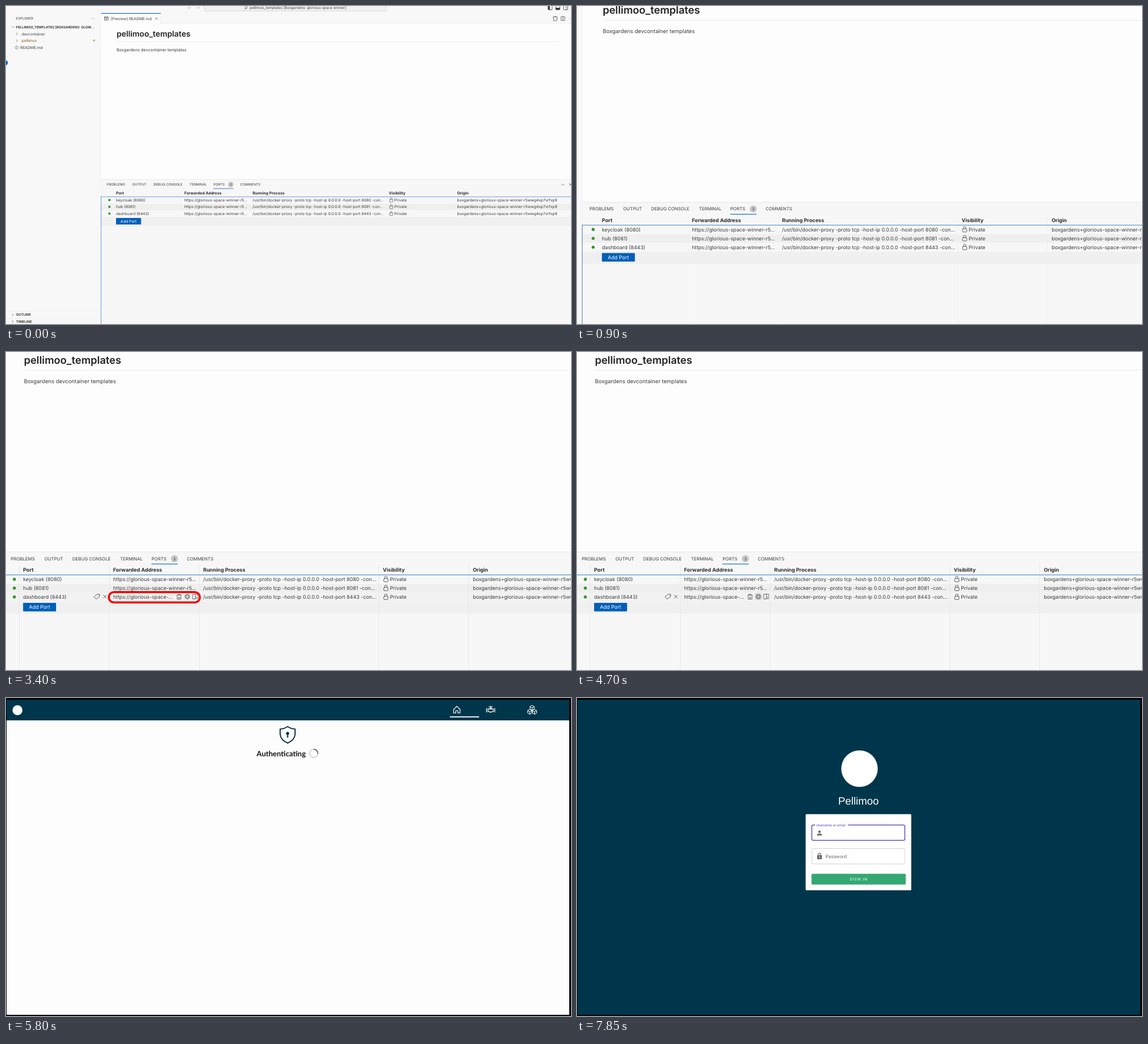
An HTML page for the animation above (8000 ms loop, 960x540 px).

```html
<!DOCTYPE html>
<html lang="en">
<head>
<meta charset="utf-8">
<title>Opening a forwarded port</title>
<style>
  html, body { margin: 0; width: 100%; height: 100%; overflow: hidden; background: #fff; }
  svg { display: block; width: 960px; height: 540px; }
  text { white-space: pre; text-rendering: geometricPrecision; }
  .ui { font-family: Inter, "Liberation Sans", sans-serif; }
  .web { font-family: Lato, "Open Sans", sans-serif; }
  .form { font-family: Roboto, sans-serif; }
  .line { fill: none; stroke-linecap: round; stroke-linejoin: round; }
</style>
</head>
<body>
<svg id="stage" viewBox="0 0 960 540" xmlns="http://www.w3.org/2000/svg"></svg>
<script>
const LOOP = 8000, STEP = 50;
const NAVY = '#00364b', INK = '#3b3b3b', BLUE = '#005fb8';
const PORT_X = [187, 303, 419, 650.5, 766.5];

// Markup helpers: text is placed by its vertical centre.
const text = (x, cy, size, str, extra = '') =>
  `<text x="${x}" y="${(cy + size * 0.36).toFixed(2)}" font-size="${size}" ${extra}>${str}</text>`;
const rect = (x, y, w, h, fill, extra = '') =>
  `<rect x="${x}" y="${y}" width="${w}" height="${h}" fill="${fill}" ${extra}/>`;
const circle = (x, y, r, fill, extra = '') =>
  `<circle cx="${x}" cy="${y}" r="${r}" fill="${fill}" ${extra}/>`;
const line = (d, color, width = 0.7, extra = '') =>
  `<path class="line" d="${d}" stroke="${color}" stroke-width="${width}" ${extra}/>`;
const group = (id, body, extra = '') => `<g id="${id}" ${extra}>${body}</g>`;
const pageFill = color => rect(1, 3, 956, 535, color);
const bold = 'font-weight="700"', mid = 'text-anchor="middle"';

function titleBar() {
  return rect(337, -6, 310, 14.5, '#f0f0f0', 'rx="3" stroke="#d2d2d2" stroke-width=".7"') +
    text(414, 3, 6.15, 'pellimoo_templates [Boxgardens: glorious space winner]') +
    line('M405 6l2-2m0 0a2 2 0 1 1 3-2.500a2 2 0 0 1-3 2.500', INK, 0.6) +
    line('M315 3h-6m2.500-2.500l-2.500 2.500l2.500 2.500M323 3h6m-2.500-2.500l2.500 2.500l-2.500 2.500', '#b5b5b5', 0.6) +
    [921, 934, 947.5].map((x, i) =>
      rect(x, -0.5, 7, 7, 'none', `rx="1" stroke="${INK}" stroke-width=".8"`) +
      [rect(x, 0, 3, 6, INK), rect(x, 3, 7, 3, INK), line(`M${x + 4.5} 0v6`, INK)][i]).join('');
}

function sidebar() {
  const chevron = (y, open) => open
    ? line(`M9.800 ${y - 1}l2 2l2-2`, INK, 0.6)
    : line(`M17.600 ${y - 2}l2 2l-2 2`, INK, 0.6);
  return circle(-1, 96.5, 4, BLUE) +
    text(17, 21.3, 5.7, 'EXPLORER') + text(145, 19.5, 7, '...') +
    chevron(36, true) + text(17, 36, 5.65, 'PELLIMOO_TEMPLATES [BOXGARDENS: GLORI...', bold) +
    chevron(47.5) + text(25, 47.5, 6.4, '.devcontainer') +
    chevron(59) + text(25, 59, 6.4, '.pellimoo', 'fill="#895503"') + circle(149.7, 58.7, 1.9, '#c3b590') +
    circle(18, 70.5, 2.7, 'none', 'stroke="#4a6f8c" stroke-width=".6"') + line('M18 70.200v1.600M18 68.900v.1', '#4a6f8c', 0.7) +
    text(24, 70.4, 6.5, 'README.md') +
    ['OUTLINE', 'TIMELINE'].map((s, i) =>
      line(`M10.500 ${522.4 + i * 11.4}l2 2l-2 2`, INK, 0.6) + text(17, 524.4 + i * 11.4, 5.75, s, bold)).join('') +
    rect(0, 518.5, 161, 0.6, '#ececec') + rect(0, 530, 161, 0.6, '#ececec');
}

function editor() {
  return rect(161.5, 12, 800, 282.5, '#fdfdfd') +
    rect(263, 12, 700, 18, '#f8f8f8') + rect(263, 29.6, 700, 0.6, '#e5e5e5') +
    rect(262.6, 12, 0.6, 18, '#e5e5e5') + rect(161.5, 12, 101.5, 1, BLUE) +
    rect(167.5, 18.3, 6, 5.6, 'none', `stroke="${INK}" stroke-width=".7"`) +
    line('M167.500 20.200h6M170.500 20.200v3.700', INK, 0.7) +
    text(178, 21.4, 6.5, '[Preview] README.md') +
    line('M253.800 19.500l3.600 3.600m0-3.600l-3.600 3.600', INK, 0.6) +
    line('M935 18h-4.500v7h5.500v-3.500M929.500 20l1.500-2M933 18.500h3.500v3', INK) +
    rect(943, 18, 6.5, 6.5, 'none', `rx=".6" stroke="${INK}" stroke-width=".7"`) + line('M946.250 18v6.500', INK) +
    text(956, 19.5, 7, '...') +
    text(188, 47, 13.4, 'pellimoo_templates', 'font-weight="600" fill="#222"') +
    rect(188, 60, 752, 0.6, '#e6e6e6') +
    text(188, 74.5, 7, 'Boxgardens devcontainer templates');
}

function panel() {
  const tabs = [[171, 'PROBLEMS'], [214.5, 'OUTPUT'], [250.5, 'DEBUG CONSOLE'], [312, 'TERMINAL'], [352.5, 'PORTS'], [398, 'COMMENTS']];
  const heads = ['Port', 'Forwarded Address', 'Running Process', 'Visibility', 'Origin'];
  const rows = [['keycloak', 8080], ['hub', 8081], ['dashboard', 8443]];
  const url = 'https://glorious-space-winner-r5...';
  let out = rect(161.5, 294.5, 800, 246, '#f7f7f7') + rect(161.5, 294.2, 800, 0.6, '#e2e2e2') +
    rect(161.5, 335.6, 800, 11.2, '#efefef') + rect(161.5, 358.2, 800, 15.6, '#f0f0f0') +
    group('rowHover', rect(161.5, 347, 800, 11.2, '#f2f2f2')) +
    group('columns', [181.6, 297.7, 413.7, 645, 760.7].map(x => rect(x, 311.5, 0.8, 230, '#e8e8e8')).join('')) +
    tabs.map(([x, s]) => text(x, 303.2, 5.75, s)).join('') +
    circle(382, 303.2, 4.6, '#c6c6c6') + text(382, 303.2, 5.2, '3', mid) +
    rect(352.3, 309.6, 34, 0.8, BLUE) +
    line('M944 304.500l2.300-2.300l2.300 2.300M957 301l4 4m0-4l-4 4', INK, 0.6) +
    heads.map((s, i) => text(PORT_X[i], 317.8, 6.6, s, 'font-weight="700" fill="#2c2c2c"')).join('');
  rows.forEach(([name, port], i) => {
    const y = 329.6 + i * 11.4;
    const cells = [`${name} (${port})`, url,
      `/usr/bin/docker-proxy -proto tcp -host-ip 0.0.0.0 -host-port ${port} -con...`,
      'Private', 'boxgardens+glorious-space-winner-r5wwg4xp7vrfxp9'];
    out += circle(175.7, y, 2, '#369432');
    cells.forEach((s, c) => {
      const extra = i === 2 && c === 1 ? 'id="fullUrl"' : '';
      out += text(PORT_X[c] + (c === 3 ? 9.2 : 0), y, 6.52, s, extra);
    });
    out += rect(651.8, y - 0.9, 5.4, 4.2, 'none', `rx=".7" stroke="${INK}" stroke-width=".6"`) +
      line(`M652.900 ${y - 0.9}v-1.300a1.600 1.600 0 0 1 3.200 0v1.300`, INK, 0.6);
  });
  return out + group('rowTools', rowTools()) +
    rect(187, 360, 42.5, 11, BLUE, 'rx=".8"') + text(208.2, 365.5, 6.55, 'Add Port', mid + ' fill="#fff"') +
    rect(161.2, 323.6, 800, 0.8, '#4b8ac4') + rect(161.2, 323.6, 0.8, 220, '#4b8ac4');
}

function rowTools() {
  return text(303, 352.4, 6.52, 'https://glorious-space-...') +
    group('underline', rect(303, 355.8, 75.5, 0.6, INK)) +
    group('tagHover', rect(277.5, 347.4, 9.6, 9.6, '#dedede', 'rx="1.500"')) +
    line('M278.600 352l4-3.200h3v3l-4.400 3.200zM284 350.400v.1', INK, 0.6) +
    line('M290.400 350l4 4m0-4l-4 4', INK, 0.6) +
    line('M387 349.600h-1.500v5.600h5v-5.600h-1.500M387 349h2v1.200h-2zM388 355v-2.500m-1 1l1-1l1 1', INK, 0.55) +
    group('globeHover', rect(393.8, 347.2, 9.6, 9.6, '#e0e0e0', 'rx="1.500"')) +
    circle(398.6, 352, 3, 'none', `stroke="${INK}" stroke-width=".55"`) +
    line('M395.800 351h5.600M395.800 353h5.600M398.600 349c-2 2-2 4 0 6c2-2 2-4 0-6', INK, 0.35) +
    line('M408.700 348.800h-3.200v6.200h3.200zM408.700 348.800h3.300v2.500', INK, 0.55) +
    circle(411, 353.7, 1.3, 'none', `stroke="${INK}" stroke-width=".5"`);
}

function nav() {
  const hex = (x, y) => line(`M${x} ${y - 3.8}l3.600 2v4l-3.600 2l-3.600-2v-4zM${x - 3.6} ${y - 1.8}l3.600 2l3.600-2M${x} ${y + 0.2}v4`, '#fff', 1);
  const label = (x, s) => text(x, 20.2, 9.8, s, 'class="label"');
  return rect(1, 3, 956, 35, NAVY) + circle(19.5, 20.8, 8.5, '#fff') +
    text(35.5, 20.4, 13.2, 'Paul Tendervik', 'class="label"') +
    group('nav0', line('M760.500 19.500l5.500-5.500l5.500 5.500v6h-3.700v-4h-3.600v4h-3.700z', '#fff', 1.2) + rect(754, 31.2, 50, 1.8, '#fff', 'rx=".9"')) +
    group('nav1', line('M816.500 17.500v6.500M830.500 17.500v6.500M819 18.200v5.200M828 18.200v5.200M819 18.700h9M819 23h2q2.500 2.500 5 0h2M823.500 18.500v-4M820.500 14.500h6M821.500 16.800h4', '#fff', 1.2)) +
    group('nav2', hex(894, 16.5) + hex(890, 23.3) + hex(898, 23.3)) +
    label(771, 'Home') + label(830, 'Pipelines') + label(902, 'Models');
}

function authenticating() {
  const navy = '#0b3350';
  return line('M478.500 48.500q6 4 12.700 4.300v8.500q-.500 10-12.700 15.200q-12.200-5.200-12.700-15.200v-8.500q6.700-.3 12.700-4.300z', navy, 2) +
    circle(478.5, 60, 2.6, navy) + line('M478.500 60v6.500', navy, 2.2) +
    text(425.8, 94, 12.6, 'Authenticating', bold + ' fill="#111"') +
    circle(523, 94, 7, 'none', 'stroke="#a4a4a4" stroke-width=".9"') +
    group('spinner', line('M523 87a7 7 0 0 1 7 7', '#222', 1.2));
}

function signIn() {
  return pageFill(NAVY) + circle(481, 113, 42, '#fff') +
    text(478, 175.5, 8.75, 'Please sign in to Pellimoo to continue', `${bold} ${mid}`) +
    rect(441, 185.5, 74.5, 27, '#339753', 'id="signButton" rx="2.500"') +
    text(478.3, 199, 8.5, 'Sign in', `${bold} ${mid}`) +
    text(407, 222.6, 8.8, 'Need help?') + text(453.5, 222.6, 8.6, 'Contact Pellimoo Support');
}

function login() {
  return pageFill(NAVY) + circle(480, 120, 31, '#fff') +
    text(478.3, 175, 18, 'Pellimoo', `${mid} font-family="Liberation Sans, sans-serif" fill="#fff"`) +
    rect(388.5, 198.5, 180, 129, '#001c28', 'rx="2" opacity=".35"') + rect(388.5, 197.2, 179.5, 129.3, '#fff', 'rx="1.500"') +
    rect(399, 215.7, 158, 26, 'none', 'id="userBox" rx="2.500"') +
    group('notch', rect(404.5, 214, 56, 4, '#fff')) +
    group('userLabel', text(0, 0, 8.1, 'Username or email')) +
    circle(412, 227.2, 2.1, '#666') + `<path d="M407.800 233.500v-1q0-2.300 4.200-2.300t4.200 2.300v1z" fill="#666"/>` +
    rect(399, 255.5, 158, 26.3, 'none', 'rx="2.500" stroke="#cfcfcf" stroke-width=".9"') +
    rect(408, 267, 8, 6.8, '#666', 'rx="1"') + line('M409.700 267v-1.200a2.300 2.300 0 0 1 4.600 0v1.200', '#666', 1.1) + circle(412, 270.3, 1, '#fff') +
    text(422.3, 268.7, 8.1, 'Password', 'fill="#6d6d6d"') +
    rect(398.5, 299.2, 160, 18.2, '#d0dad4', 'rx="2"') + rect(398.5, 298.5, 160, 18, '#34a872', 'rx="1.500"') +
    text(478.8, 307.6, 6.6, 'SIGN IN', `${mid} fill="#fff" letter-spacing="1.100"`);
}

const stage = document.getElementById('stage');
stage.innerHTML =
  group('desk', group('world', rect(-10, -10, 980, 560, '#f8f8f8') + rect(161.2, 12, 0.6, 529, '#e5e5e5') +
    titleBar() + sidebar() + editor() + panel(), `class="ui" fill="${INK}"`) +
    rect(174.7, 407.8, 154.7, 17.5, 'none', 'id="ring" rx="8.700" stroke="#f40000" stroke-width="3.500"')) +
  group('site', rect(-400, -400, 1800, 1400, '#000') + pageFill('#fdfdfd') +
    group('auth', authenticating()) + group('sign', signIn(), 'fill="#fff"') + group('nav', nav(), 'fill="#fff"') +
    group('login', login(), 'class="form"'), 'class="web"');

const el = {};
stage.querySelectorAll('[id]').forEach(n => el[n.id] = n);
const labels = [...stage.querySelectorAll('.label')];

const show = (node, on) => { node.style.display = on ? '' : 'none'; };
const between = (t, a, b) => t >= a && t < b;
const ramp = (t, a, b) => Math.min(1, Math.max(0, (t - a) / (b - a)));
const mix = (a, b, p) => a + (b - a) * p;
const sineInOut = p => (1 - Math.cos(Math.PI * p)) / 2;
const sineOut = p => Math.sin(Math.PI * p / 2);
const place = (node, x, y, s = 1) => node.setAttribute('transform', `translate(${x.toFixed(3)} ${y.toFixed(3)}) scale(${s.toFixed(5)})`);

// The zoom settles first; the slower pan carries on after it.
function drawDesk(t) {
  const zoom = mix(1, 1.3185, sineOut(ramp(t, 0, 870)));
  const pan = sineInOut(ramp(t, 40, 1250));
  const nudge = ramp(t, 3000, 3200);
  place(el.world, 480 - mix(480, 528.25, pan) * zoom - nudge, 270 - mix(270, 240.95, pan) * zoom - nudge, zoom);
  el.columns.style.opacity = ramp(t, 850, 1050);

  const hover = t >= 3100;
  show(el.rowHover, hover);
  show(el.rowTools, hover);
  show(el.fullUrl, !hover);
  show(el.tagHover, between(t, 3200, 3400));
  show(el.underline, between(t, 3900, 4050));
  show(el.globeHover, t >= 4100);
  show(el.ring, between(t, 1600, 4700));
  el.ring.style.opacity = ramp(t, 1550, 1650);
}

function drawSite(t) {
  const out = sineInOut(ramp(t, 5100, 5550));
  place(el.site, mix(-241, 0, out), mix(-58, 0, out), mix(1.369, 1, out));
  show(el.nav, between(t, 5800, 7400));
  show(el.auth, between(t, 5800, 6250));
  show(el.sign, between(t, 6250, 7400));
  show(el.login, t >= 7400);

  const named = t >= 5850;
  labels.forEach(n => show(n, named));
  [-4.3, -3, -2].forEach((dx, i) => place(el['nav' + i], named ? dx : 0, 0));
  el.spinner.setAttribute('transform', `rotate(${(t - 5800) * 0.36} 523 94)`);
  el.signButton.setAttribute('fill-opacity', mix(1, 0.88, ramp(t, 6800, 7000)));

  const focus = sineInOut(ramp(t, 7550, 7800));
  place(el.userLabel, mix(422.3, 406.2, focus), mix(229, 215.6, focus), mix(1, 0.735, focus));
  el.userLabel.setAttribute('fill', focus > 0 ? '#6650bd' : '#6d6d6d');
  el.userBox.setAttribute('stroke', focus > 0 ? '#4a3fae' : '#cfcfcf');
  el.userBox.setAttribute('stroke-width', mix(0.9, 1.3, focus));
  show(el.notch, focus > 0.6);
}

function frame(now) {
  const t = Math.floor((now % LOOP) / STEP) * STEP;
  const desk = t < 4850;
  show(el.desk, desk);
  show(el.site, !desk);
  desk ? drawDesk(t) : drawSite(t);
  requestAnimationFrame(() => frame(performance.now() - start));
}
const start = performance.now();
frame(0);
</script>
</body>
</html>
```
